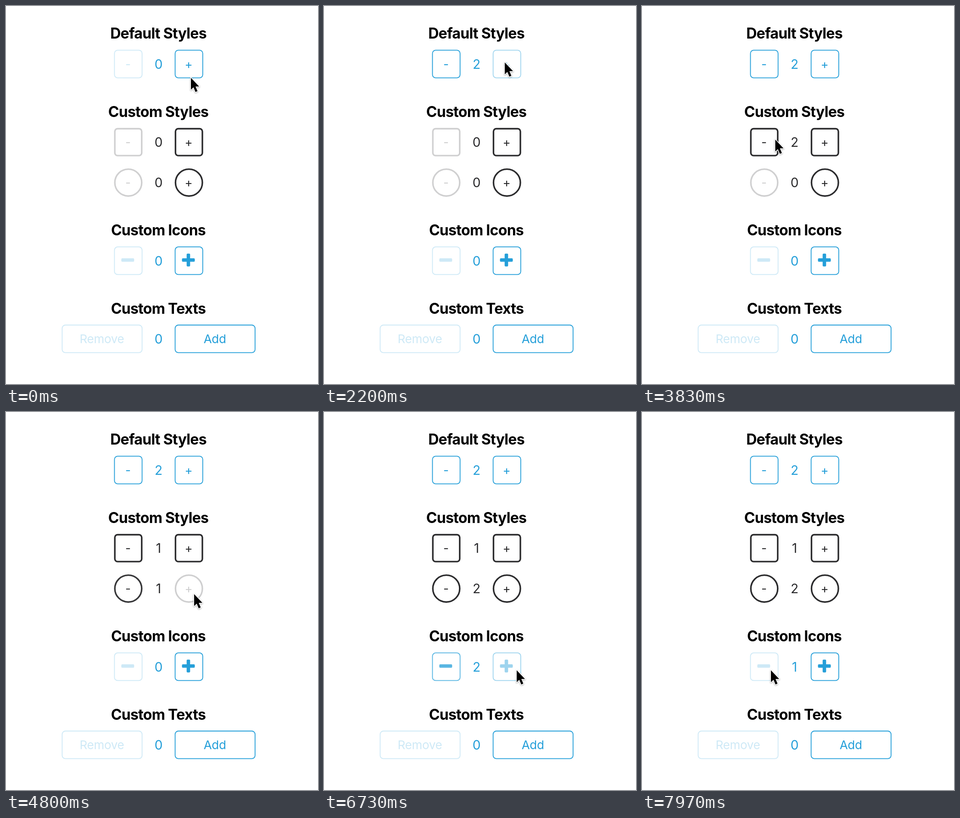
Animation of 680 by 824 pixels, one loop 8000 ms. Source, as an HTML page:

```html
<!DOCTYPE html>
<html lang="en">
<head>
<meta charset="utf-8">
<title>Counter buttons</title>
<style>
  html, body { margin: 0; width: 100%; height: 100%; overflow: hidden; background: #fff; }
  svg { display: block; }
  text { font-family: Inter, "Open Sans", sans-serif; text-anchor: middle; fill: currentColor; }
  .title { font-size: 32px; font-weight: 700; letter-spacing: -.022em; color: #000; }
  .count { font-size: 28px; }
  .label { font-size: 26px; letter-spacing: -.01em; }
  .blue { color: #259fd9; }
  .dark { color: #2b2b2d; }
  .frame { fill: none; stroke: currentColor; }
  .icon { fill: currentColor; }
  .pointer { fill: #000; stroke: #fff; stroke-width: 3; stroke-linejoin: round; paint-order: stroke;
    filter: drop-shadow(0 1.5px 1.5px rgba(0, 0, 0, .35)); }
</style>
</head>
<body>
<svg id="stage" width="680" height="824" viewBox="0 0 680 824">
  <g id="rows"></g>
  <path id="pointer" class="pointer" d="M0 0V26L5.6 20.8L10 31L14.4 29.1L10.1 19H18Z"/>
</svg>
<script>
const LOOP = 8000, FADED = 0.22;
const LEFT = 266.5, MIDDLE = 332.5, RIGHT = 398.7;

const titles = [
  ["Default Styles", 71.2], ["Custom Styles", 241.5],
  ["Custom Icons", 500], ["Custom Texts", 670.5]
];

// Each press: [time down, time up]
const rows = [
  { y: 126.5, tone: "blue", line: 1.8, radius: 7,
    plus: [[1230, 1520], [1840, 2110]], minus: [] },
  { y: 296.8, tone: "dark", line: 3.4, radius: 6,
    plus: [[2780, 3000], [3200, 3390]], minus: [[3950, 4090]] },
  { y: 384.9, tone: "dark", line: 3.4, radius: 30,
    plus: [[4600, 4890], [4950, 5270], [5300, 5360]], minus: [[5740, 5830]] },
  { y: 555.3, tone: "blue", line: 1.8, radius: 7, icons: true,
    plus: [[6580, 6670], [6690, 6860]], minus: [[7770, LOOP]] },
  { y: 725.6, tone: "blue", line: 1.8, radius: 7, wide: true, words: ["Remove", "Add"],
    plus: [], minus: [] }
];

// Pointer moves: [start, end, x, y]
const moves = [
  [30, 270, 394, 123],
  [2320, 2720, 394, 293],
  [3570, 3930, 272, 291],
  [4130, 4490, 410, 397],
  [5425, 5720, 285, 397],
  [5850, 6250, 420, 563],
  [7150, 7720, 281, 563]
];

const clamp = u => Math.min(1, Math.max(0, u));
const ease = u => u < 0.5 ? 2 * u * u : 1 - 2 * (1 - u) ** 2;
const mix = (a, b, u) => a + (b - a) * u;

function add(parent, tag, attrs, text = "") {
  const el = document.createElementNS("http://www.w3.org/2000/svg", tag);
  for (const key in attrs) el.setAttribute(key, attrs[key]);
  el.textContent = text;
  return parent.appendChild(el);
}

function addButton(parent, row, side) {
  const isPlus = side === 1;
  const g = add(parent, "g", {});
  const w = row.wide ? 176 : 62;
  const x = isPlus ? RIGHT - 31 : LEFT + 31 - w;
  const inset = row.line / 2;
  add(g, "rect", {
    class: "frame", x: x + inset, y: row.y - 31 + inset,
    width: w - row.line, height: 62 - row.line, rx: row.radius, "stroke-width": row.line
  });
  const cx = x + w / 2;
  if (row.icons) {
    const iconX = cx - 1.2, iconY = row.y - 1.5;
    add(g, "rect", { class: "icon", x: iconX - 14, y: iconY - 3.8, width: 28, height: 7.6, rx: 2 });
    if (isPlus) add(g, "rect", { class: "icon", x: iconX - 3.8, y: iconY - 14, width: 7.6, height: 28, rx: 2 });
  } else {
    const word = row.words ? row.words[side] : "-+"[side];
    add(g, "text", { class: "label", x: row.words ? cx - .5 : cx - .7, y: row.y + 9.3 }, word);
  }
  return g;
}

// Replays fades in order; each starts from the value the last one had reached.
function fadeAt(t, start, fades) {
  let from = start, last = null;
  const value = at => last ? mix(from, last.to, ease(clamp((at - last.at) / last.ms))) : start;
  for (const fade of fades) {
    if (fade.at > t) break;
    from = value(fade.at);
    last = fade;
  }
  return value(t);
}

const pressFades = presses => presses.flatMap(([down, up]) => [
  { at: down, to: FADED, ms: 150 },
  { at: up, to: 1, ms: 250 }
]);

const layer = document.getElementById("rows");
const pointer = document.getElementById("pointer");

for (const [text, y] of titles) add(layer, "text", { class: "title", x: 332, y }, text);

for (const row of rows) {
  const g = add(layer, "g", { class: row.tone });
  row.minusEl = addButton(g, row, 0);
  row.plusEl = addButton(g, row, 1);
  row.countEl = add(g, "text", { class: "count", x: MIDDLE, y: row.y + 10.3 }, "0");
  row.plusFades = pressFades(row.plus);
  // The first addition enables the minus button.
  row.minusFades = row.plus.slice(0, 1).map(([at]) => ({ at, to: 1, ms: 250 }))
    .concat(pressFades(row.minus));
}

function draw(t) {
  const pressed = list => list.filter(([down]) => down <= t).length;
  for (const row of rows) {
    row.countEl.textContent = pressed(row.plus) - pressed(row.minus);
    row.plusEl.setAttribute("opacity", fadeAt(t, 1, row.plusFades));
    row.minusEl.setAttribute("opacity", fadeAt(t, FADED, row.minusFades));
  }
  let x = 403, y = 156.5;
  for (const [start, end, toX, toY] of moves) {
    const u = ease(clamp((t - start) / (end - start)));
    x = mix(x, toX, u);
    y = mix(y, toY, u);
  }
  pointer.setAttribute("transform", `translate(${x} ${y})`);
}

const begin = performance.now();
function tick() {
  draw((performance.now() - begin) % LOOP);
  requestAnimationFrame(tick);
}
draw(0);
requestAnimationFrame(tick);
</script>
</body>
</html>
```
